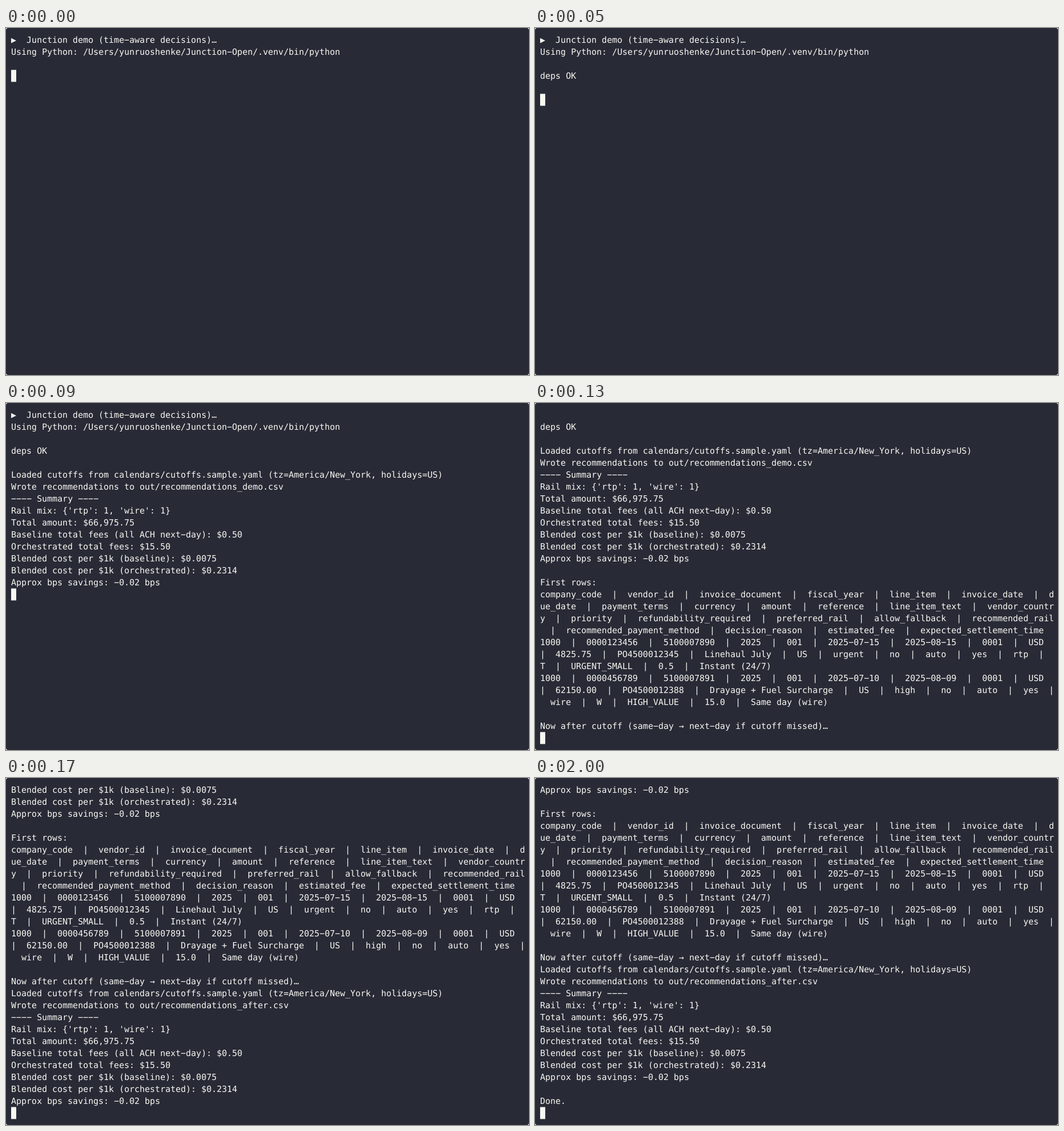
These frames come from a looping animation (919x609 px, 3200 ms). An HTML page:

```html
<!DOCTYPE html>
<html lang="en">
<head>
<meta charset="utf-8">
<title>Terminal session</title>
<style>
  html, body { margin: 0; width: 100%; height: 100%; overflow: hidden; background: #fff; }
  #screen {
    position: relative; width: 919px; height: 609px; overflow: hidden;
    border-radius: 4px; background: #282a36; color: #f8f8f2;
    font: 15px/21px "DejaVu Sans Mono", monospace;
    font-variant-ligatures: none; text-rendering: geometricPrecision;
  }
  #text { position: absolute; left: 9px; top: 10.8px; margin: 0; font: inherit; }
  /* Wide hyphen: the character stays as text, a longer dash is set over it. */
  #text i { font-style: normal; color: transparent; }
  #text i::after { content: "\2212"; margin-left: -1ch; color: #f8f8f2; }
  #cursor { position: absolute; left: 9px; top: 0; width: 9px; height: 21px; background: #f8f8f2; }
</style>
</head>
<body>
<div id="screen"><pre id="text"></pre><div id="cursor"></div></div>
<script>
const COLS = 100, ROWS = 28, ROW_HEIGHT = 21, TOP = 10.5, LOOP = 3200;

const row = (...cells) => cells.join("  |  ");

const report = name => [
  "Loaded cutoffs from calendars/cutoffs.sample.yaml (tz=America/New_York, holidays=US)",
  `Wrote recommendations to out/recommendations_${name}.csv`,
  "---- Summary ----",
  "Rail mix: {'rtp': 1, 'wire': 1}",
  "Total amount: $66,975.75",
  "Baseline total fees (all ACH next-day): $0.50",
  "Orchestrated total fees: $15.50",
  "Blended cost per $1k (baseline): $0.0075",
  "Blended cost per $1k (orchestrated): $0.2314",
  "Approx bps savings: -0.02 bps"
];

const table = [
  row("company_code", "vendor_id", "invoice_document", "fiscal_year", "line_item",
    "invoice_date", "due_date", "payment_terms", "currency", "amount", "reference",
    "line_item_text", "vendor_country", "priority", "refundability_required",
    "preferred_rail", "allow_fallback", "recommended_rail",
    "recommended_payment_method", "decision_reason", "estimated_fee",
    "expected_settlement_time"),
  row("1000", "0000123456", "5100007890", "2025", "001", "2025-07-15", "2025-08-15",
    "0001", "USD", "4825.75", "PO4500012345", "Linehaul July", "US", "urgent", "no",
    "auto", "yes", "rtp", "T", "URGENT_SMALL", "0.5", "Instant (24/7)"),
  row("1000", "0000456789", "5100007891", "2025", "001", "2025-07-10", "2025-08-09",
    "0001", "USD", "62150.00", "PO4500012388", "Drayage + Fuel Surcharge", "US", "high",
    "no", "auto", "yes", "wire", "W", "HIGH_VALUE", "15.0", "Same day (wire)")
];

// Each burst of output: [time in ms, lines printed].
const bursts = [
  [0, ["▶  Junction demo (time-aware decisions)…",
    "Using Python: /Users/yunruoshenke/Junction-Open/.venv/bin/python", ""]],
  [50, ["deps OK", ""]],
  [90, report("demo")],
  [130, ["", "First rows:", ...table, "",
    "Now after cutoff (same-day → next-day if cutoff missed)…"]],
  [170, report("after")],
  [200, ["", "Done."]]
];

const wrap = line => line.match(new RegExp(`.{1,${COLS}}`, "g")) || [""];

const log = [];
const states = bursts.map(([time, lines]) => {
  log.push(...lines.flatMap(wrap));
  const visible = log.slice(-(ROWS - 1));
  return { time, rows: visible.length, html: visible.join("\n").replace(/-/g, "<i>-</i>") };
});

const text = document.getElementById("text");
const cursor = document.getElementById("cursor");
let shown;

function draw() {
  const time = performance.now() % LOOP;
  const state = states.findLast(s => s.time <= time);
  if (state !== shown) {
    shown = state;
    text.innerHTML = state.html;
    cursor.style.transform = `translateY(${TOP + state.rows * ROW_HEIGHT}px)`;
  }
  requestAnimationFrame(draw);
}
draw();
</script>
</body>
</html>
```
